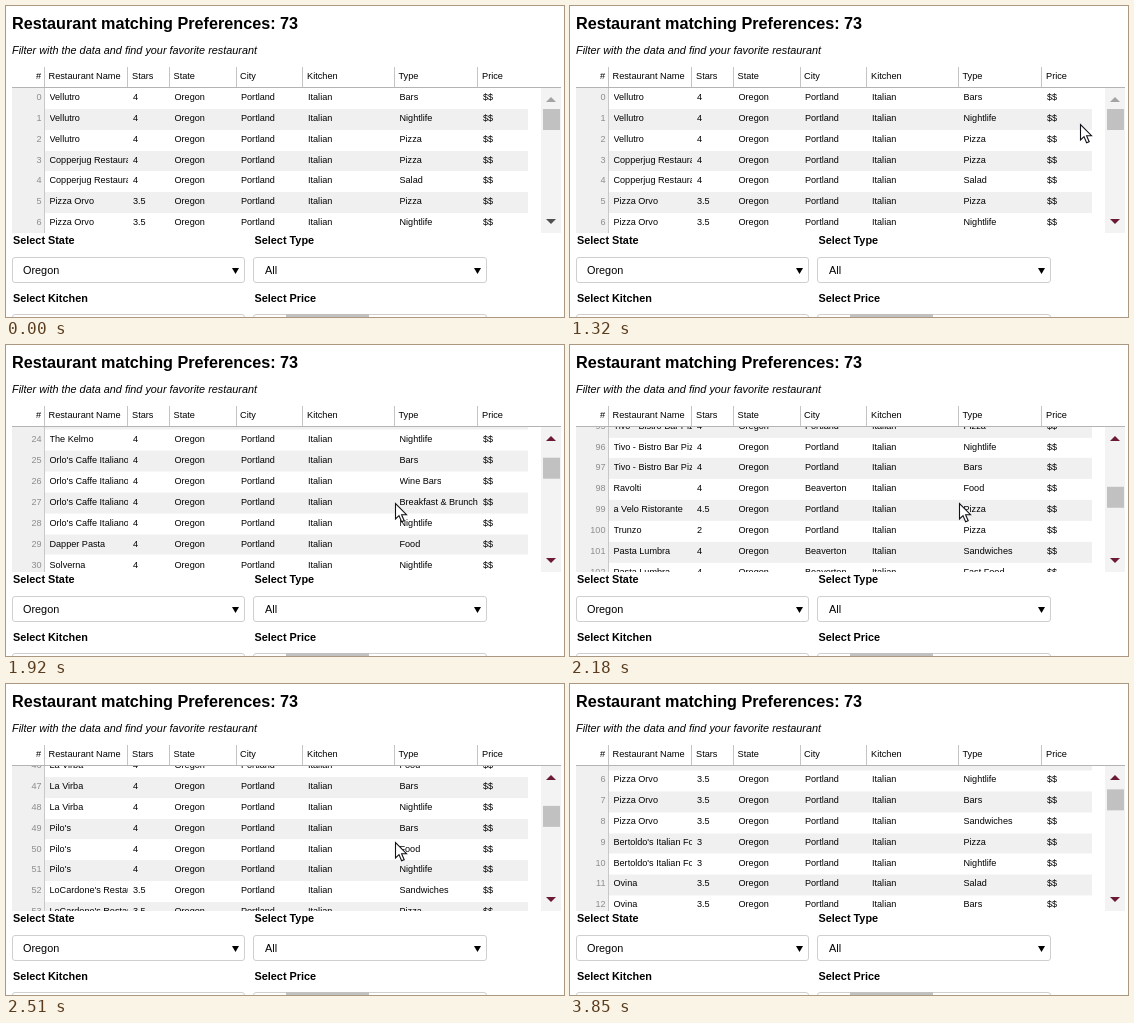
Recreate the animation shown at these times as an HTML page. Size 558 by 311 pixels, loop 3980 ms.

```html
<!DOCTYPE html>
<html lang="en">
<head>
<meta charset="utf-8">
<title>Restaurant table</title>
<style>
@property --row { syntax: "<number>"; inherits: true; initial-value: 0; }

html, body { margin: 0; width: 100%; height: 100%; overflow: hidden; background: #fff; }
body { font: 10.86px/20px "Liberation Sans", Arial, sans-serif; color: #000; }
body * { position: absolute; box-sizing: border-box; white-space: pre; }

#stage { left: 0; top: 0; width: 558px; height: 311px; overflow: hidden; }
h1 { margin: 0; left: 6px; top: 7px; font-size: 16.2px; line-height: 20px; }
#hint { left: 6px; top: 34px; font-style: italic; }

/* table */
#head { left: 6px; top: 61px; width: 549px; height: 21px; border-bottom: 1px solid #b4b4b4; font-size: 9.2px; line-height: 18px; }
#head span { top: 0; }
#head i { top: 0; width: 1px; height: 20px; background: #c4c4c4; }
#grid {
  left: 6px; top: 82px; width: 549px; height: 145px; overflow: hidden;
  --pitch: 20.85px;
  animation: scroll 3980ms step-end infinite;
}
#gutter { left: 0; top: 0; width: 33px; height: 145px; background: #f0f0f0; border-right: 1px solid #c8c8c8; }
#sheet { left: 0; top: 0; width: 516px; font-size: 9.1px; line-height: 19.4px; transform: translateY(calc(var(--row) * var(--pitch) * -1)); }
.row { left: 0; width: 516px; height: var(--pitch); }
.row.odd::before { content: ""; position: absolute; left: 33px; right: 0; top: 0; bottom: 0; background: #f0f0f0; }
.row span { top: 0; overflow: hidden; height: 100%; }
.row .num { left: 0; width: 29.5px; text-align: right; color: #8c8c8c; }
.row .name { width: 78px; }

#track { left: 529px; top: 0; width: 20px; height: 145px; background: #f3f3f3; }
#thumb { left: 2px; top: 21px; width: 17px; height: 21px; background: #c1c1c1; transform: translateY(calc(var(--row) * .406px)); }
.tip { left: 5px; width: 10px; height: 5px; }
#up { top: 9px; background: #a3a3a3; clip-path: polygon(50% 0, 100% 100%, 0 100%); animation: up 3980ms step-end infinite; }
#down { top: 131px; background: #505050; clip-path: polygon(0 0, 100% 0, 50% 100%); animation: down 3980ms step-end infinite; }

/* filters */
.label { font-weight: bold; }
.select { width: 233px; height: 26px; border: 1px solid #cfcfcf; border-radius: 3px; line-height: 24px; padding-left: 10px; background: #fff; }
.select::after { content: ""; position: absolute; right: 5px; top: 10px; width: 7px; height: 6px; background: #000; clip-path: polygon(0 0, 100% 0, 50% 100%); }
#bar { left: 280px; top: 308px; width: 83px; height: 3px; background: #c1c1c1; }

#mouse { left: 0; top: 0; width: 14px; height: 21px; overflow: visible; animation: mouse 3980ms step-end infinite; }

@keyframes scroll {
  0% { --row: 0; }
  40.4% { --row: 2; }
  41.4% { --row: 5; }
  44.9% { --row: 11; }
  46.6% { --row: 17; }
  48.2% { --row: 23.86; }
  49.7% { --row: 40; }
  51.5% { --row: 58; }
  53.1% { --row: 77; }
  54.7% { --row: 95.5; }
  56.4% { --row: 104; }
  58% { --row: 106; }
  59.7% { --row: 88; }
  61.5% { --row: 67; }
  63% { --row: 46.47; }
  64.8% { --row: 29; }
  66.5% { --row: 16; }
  68.5% { --row: 8; }
  96.7%, 100% { --row: 5.78; }
}
@keyframes up {
  0% { background: #a3a3a3; }
  40.4%, 100% { background: #6a1a32; }
}
@keyframes down {
  0% { background: #505050; }
  26.6%, 100% { background: #6a1a32; }
}
@keyframes mouse {
  0% { opacity: 0; transform: translate(556px, 103px); }
  26.6% { opacity: 1; transform: translate(556px, 103px); animation-timing-function: steps(4, end); }
  33.1% { opacity: 1; transform: translate(510px, 118px); animation-timing-function: steps(3, end); }
  38.1% { opacity: 1; transform: translate(389px, 158px); }
  68.5%, 100% { opacity: 0; transform: translate(389px, 158px); }
}
</style>
</head>
<body>
<div id="stage">
  <h1>Restaurant matching Preferences: 73</h1>
  <div id="hint">Filter with the data and find your favorite restaurant</div>
  <div id="head"></div>
  <div id="grid">
    <div id="gutter"></div>
    <div id="sheet"></div>
    <div id="track">
      <div id="up" class="tip"></div>
      <div id="thumb"></div>
      <div id="down" class="tip"></div>
    </div>
  </div>

  <div class="label" style="left:7px;top:224px">Select State</div>
  <div class="label" style="left:248.5px;top:224px">Select Type</div>
  <div class="select" style="left:6px;top:251px">Oregon</div>
  <div class="select" style="left:247px;top:251px;width:234px;padding-left:11px">All</div>
  <div class="label" style="left:7px;top:282px">Select Kitchen</div>
  <div class="label" style="left:248.5px;top:282px">Select Price</div>
  <div class="select" style="left:6px;top:308px"></div>
  <div class="select" style="left:247px;top:308px;width:234px"></div>
  <div id="bar"></div>

  <svg id="mouse" viewBox="0 0 14 21">
    <path d="M.5 .5V16L4 12.6L6.6 18.8L9.2 17.7L6.6 11.7H11.5Z" fill="#fff" stroke="#101018" stroke-width="1.1"/>
  </svg>
</div>

<script>
const TYPES = {
  B: "Bars", N: "Nightlife", P: "Pizza", S: "Salad", W: "Sandwiches", V: "Vegetarian",
  I: "Wine Bars", K: "Breakfast & Brunch", F: "Food", T: "Fast Food"
};

// name | stars | one letter per row | city, if not Portland
const PLACES = `Vellutro|4|BNP
Copperjug Restaurant|4|PS
Pizza Orvo|3.5|PNBW
Bertoldo's Italian Food|3|PN
Ovina|3.5|SBVN
Trattoria Ombri|4|PFNB
Borgo Lento|3.5|SPWNB
The Kelmo|4|N
Orlo's Caffe Italiano|4|BIKN
Dapper Pasta|4|F
Solverna|4|NBP
Osteria Pelna|4|FPNB
Forno Tamba|3.5|PSNBW
Casa Fiorvale|4|FVNB
La Virba|4|FBN
Pilo's|4|BFN
LoCardone's Restaurant|3.5|WPSN
Cantina Dulmo|4|PBNFS
Tavola Grenzi|3.5|FPNB
Pizza Quembo|3|PSWN
Osteria Vambra|4|IBNFP
Forno Lestri|4.5|PNBS
Casa Mundrova|3.5|FVPN
Borgo Tinzo|4|BNPW
Trattoria Elvo|3|PSFNB
Cucina Drazza|4|NBIP
Tivo - Bistro Bar Pizzeria|4|PNB
Ravolti|4|F|Beaverton
a Velo Ristorante|4.5|P
Trunzo|2|P
Pasta Lumbra|4|WTP|Beaverton
Tavola Prenda|3.5|FPNB
Cantina Solmi|4|BNIP
Forno Gulvo|3|PSWF`;

const make = (parent, tag, left, text = "", cls = "") => {
  const el = document.createElement(tag);
  el.className = cls;
  el.textContent = text;
  if (left !== null) el.style.left = left + "px";
  return parent.appendChild(el);
};

const head = document.getElementById("head");
const sheet = document.getElementById("sheet");

const columns = [["Restaurant Name", 36.5], ["Stars", 120], ["State", 161.5], ["City", 228],
  ["Kitchen", 295], ["Type", 386.5], ["Price", 470]];
make(head, "span", 24, "#");
columns.forEach(([title, x]) => make(head, "span", x, title));
[32, 115, 157, 224, 290, 382, 465].forEach(x => make(head, "i", x));

let index = 0;
for (const line of PLACES.split("\n")) {
  const [name, stars, types, city = "Portland"] = line.split("|");
  for (const type of types) {
    const row = make(sheet, "div", null, "", index % 2 ? "row odd" : "row");
    row.style.top = `calc(var(--pitch) * ${index})`;
    make(row, "span", null, index, "num");
    [name, stars, "Oregon", city, "Italian", TYPES[type], "$$"].forEach((text, i) =>
      make(row, "span", columns[i][1] + 1, text, i ? "" : "name"));
    index++;
  }
}
</script>
</body>
</html>
```
